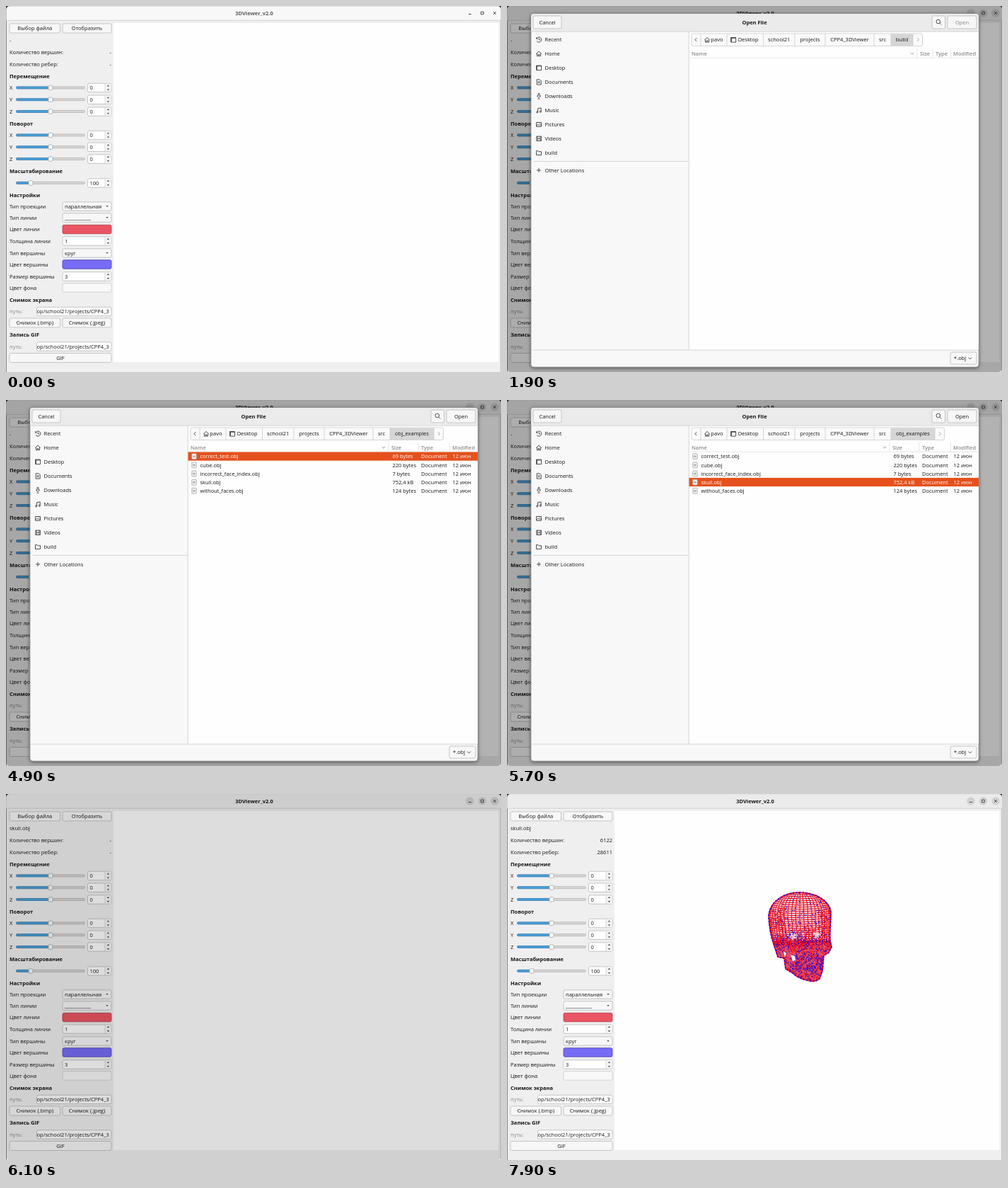
These frames come from a looping animation (700x517 px, 8000 ms). An HTML page:

```html
<!DOCTYPE html>
<html lang="ru">
<head>
<meta charset="utf-8">
<title>3DViewer_v2.0</title>
<style>
html, body { margin: 0; width: 100%; height: 100%; overflow: hidden; background: #2a2a2a; }
svg { display: block; }
#stage { width: 100vw; height: 100vh; }
text { font: 500 7.5px "Open Sans", "Noto Sans", sans-serif; fill: #161616; white-space: pre; }
.b { font-weight: 700; }
.dim { fill: #858585; }
.head { font-weight: 600; fill: #8c8c8c; }
.white { fill: #fff; }
.icon { fill: none; stroke: #3d3d3d; stroke-width: .9; }
#dialog { filter: drop-shadow(0 1px 2.5px rgba(0, 0, 0, .55)); }
</style>
</head>
<body>
<svg id="stage" viewBox="0 0 700 517">
  <defs><clipPath id="skullClip"><path id="skullShape"/></clipPath></defs>
  <g id="main"></g>
  <rect id="shade" width="700" height="517" rx="5"/>
  <g id="dialog"></g>
</svg>
<script>
const LOOP = 8000, TICK = 100;
const PANEL = '#efefef', LINE = '#cccccc', EDGE = '#b9b9b9', BUTTON = '#f7f7f7', PAPER = '#fefefe';
const $ = id => document.getElementById(id);

const text = (x, y, s, cls = '', anchor = 'start') =>
  `<text x="${x}" y="${y + 2.7}" class="${cls}" text-anchor="${anchor}">${s}</text>`;
const rect = (x, y, w, h, fill, stroke = 'none', r = 0) =>
  `<rect x="${x}" y="${y}" width="${w}" height="${h}" fill="${fill}" stroke="${stroke}" stroke-width=".8" rx="${r}"/>`;
const path = (d, attrs = 'class="icon"') => `<path d="${d}" ${attrs}/>`;
const button = (x, y, w, label, h = 13, cls = '') =>
  rect(x, y - h / 2, w, h, BUTTON, EDGE, 2) + text(x + w / 2, y, label, cls, 'middle');

// Main window
const SMALL = 'fill="#4a4a4a"';
const up = (x, y) => path(`M${x - 1.7} ${y + 1}h3.4l-1.7 -2z`, SMALL);
const down = (x, y) => path(`M${x - 1.7} ${y - 1}h3.4l-1.7 2z`, SMALL);

function spin(x, y, value) {
  return rect(x, y - 6.2, 149 - x, 12.4, PAPER, EDGE, 2) + rect(140, y - 5.8, 8.6, 11.6, '#f3f3f3') +
    path(`M140 ${y - 6}v12`, `stroke="${LINE}" stroke-width=".7"`) +
    up(144.5, y - 3) + down(144.5, y + 3) + text(x + 3, y, value);
}
function slider(y, pos, value, axis = '') {
  return text(5, y, axis) + rect(14.5, y - 1.6, 97, 3, '#d6d6d6', '#b4b4b4', 1.4) +
    rect(14.5, y - 1.6, pos - 14.5, 3, '#4a9fd8', '#3a83b6', 1.4) +
    rect(pos - 3, y - 3.2, 6, 6.4, '#fafafa', '#a5a5a5', 1.5) + spin(115.5, y, value);
}
const combo = (y, value) =>
  rect(80, y - 6.2, 69, 12.4, BUTTON, EDGE, 2) + text(83, y, value) + down(143, y);
const swatch = (y, fill, edge) => rect(80, y - 6.2, 69, 12.4, fill, edge, 2);
const pathField = y => text(5, y, 'путь:', 'dim') + rect(43.5, y - 6.2, 105.5, 12.4, PAPER, EDGE, 2) +
  `<svg x="43.5" y="${y - 6}" width="105" height="12">${text(0, 6, 'op/school21/projects/CPP4_3')}</svg>`;

function mainWindow() {
  const sections = [[99, 'Перемещение'], [166, 'Поворот'], [233, 'Масштабирование'],
    [267, 'Настройки'], [415, 'Снимок экрана'], [464, 'Запись GIF']];
  const labels = [[65, 'Количество вершин:'], [82, 'Количество ребер:'], [283, 'Тип проекции'],
    [299, 'Тип линии'], [315.5, 'Цвет линии'], [332, 'Толщина линии'], [349, 'Тип вершины'],
    [365, 'Цвет вершины'], [382, 'Размер вершины'], [398, 'Цвет фона']];
  const circles = [656, 673.5, 691].map(x => `<circle cx="${x}" cy="10" r="5.8" fill="#d2d2d2"/>`).join('');
  const bar = fill => path('M.5 20V5Q.5 .4 5 .4H695Q699.6 .4 699.6 5V20z', `fill="${fill}"`);
  return rect(.5, 0, 699.5, 530, PANEL, '#8a8a8a', 5) + bar('#f8f8f8') +
    `<g id="focused">${bar('#ebebeb') + circles}</g>` +
    path('M0 20.3H700', `stroke="${LINE}" stroke-width=".8"`) +
    rect(152, 24, 544.5, 479, PAPER) +
    path('M654 11.5h4M671.7 8.2h3.6v3.6h-3.6zM689.2 8.2l3.6 3.6M692.8 8.2l-3.6 3.6') +
    `<g id="title">${text(351, 10, '3DViewer_v2.0', 'b', 'middle')}</g>` +
    button(5, 31.5, 71.5, 'Выбор файла') + button(80, 31.5, 69, 'Отобразить') +
    '<g id="info"></g>' +
    sections.map(([y, s]) => text(5, y, s, 'b')).join('') +
    labels.map(([y, s]) => text(5, y, s)).join('') +
    [115.5, 182.5].map(y => [...'XYZ'].map((a, i) => slider(y + i * 16.8, 63, '0', a)).join('')).join('') +
    slider(250, 35, '100') +
    combo(283, 'параллельная') + combo(299, '___________') + swatch(315.5, '#ea5563', '#b03c48') +
    spin(80, 332, '1') + combo(349, 'круг') + swatch(365, '#776cf6', '#4a40b4') +
    spin(80, 382, '3') + swatch(398, '#f8f8f8', LINE) +
    pathField(431.5) + button(5, 447.5, 71.5, 'Снимок (.bmp)') + button(80, 447.5, 69, 'Снимок (.jpeg)') +
    pathField(481) + button(5, 497, 144, 'GIF') +
    `<g id="skull">${skull()}</g>`;
}

// Wireframe head
function skull() {
  const shape = 'M370 172C372 150 394 139 413 139C436 139 455 150 458 166C458 180 456 194 457 208L459 216' +
    'L455 224L448 228L446 250L442 261Q436 266 428 264Q412 261 404 253L394 247L392 232L383 230L377 212Q371 194 370 172Z';
  $('skullShape').setAttribute('d', shape);
  let seed = 11;
  const rnd = () => (seed = seed * 16807 % 2147483647) / 2147483647;
  const stroke = (c, w) => `fill="none" stroke="${c}" stroke-width="${w}"`;
  const scatter = (n, x, y, w, h, mark) => Array.from({ length: n }, () =>
    `M${(x + w * rnd()).toFixed(1)} ${(y + h * rnd()).toFixed(1)}${mark()}`).join('');
  const scribble = (n, x, y, w, h, len) => scatter(n, x, y, w, h, () =>
    `l${(len * (rnd() - .5)).toFixed(1)} ${(len * (rnd() - .5)).toFixed(1)}`);
  const dots = (n, x, y, w, h) => scatter(n, x, y, w, h, () => 'h1.3');

  let grid = '';
  for (let i = -12; i <= 12; i++) {
    const s = Math.sin(i * Math.PI / 24);
    grid += `M${415 + 10 * s} 138C${414 + 40 * s} 143 ${414 + 46 * s} 162 ${414 + 44 * s} 176L${417 + 41 * s} 214`;
  }
  for (let y = 140; y < 214; y += 3) grid += `M368 ${y - 2}Q414 ${y + 6} 460 ${y - 2}`;

  const RED = '#e2041c', BLUE = '#2408e0';
  return `<g clip-path="url(#skullClip)">` +
    rect(365, 135, 100, 75, '#fbdcdc') + rect(365, 207, 100, 60, '#e84a5c') +
    path(grid, stroke(RED, 1)) +
    path(scribble(190, 371, 160, 22, 55, 6) + scribble(130, 443, 160, 15, 50, 6) +
      scribble(90, 385, 186, 66, 22, 6), stroke(RED, .9)) +
    path('M398 199q7 -6 13 0q-2 6 -8 6zM432 198q6 -6 11 0q-2 6 -7 6z', 'fill="#fdeeee" opacity=".7"') +
    path(scribble(260, 378, 205, 80, 20, 7) + scribble(100, 412, 190, 24, 26, 6) +
      scribble(260, 392, 228, 56, 36, 7), stroke(RED, 1)) +
    path(scribble(150, 404, 226, 44, 22, 6) + scribble(90, 380, 204, 76, 20, 5) +
      scribble(40, 396, 246, 48, 17, 5), stroke(BLUE, 1)) +
    path(dots(210, 370, 139, 90, 70) + dots(130, 376, 194, 80, 34) + dots(90, 393, 228, 54, 36), stroke(BLUE, 1.3)) +
    path('M401 227l6 2l1 6l-4 1zM391 222l4 3l-2 6z', `fill="${PAPER}"`) + '</g>' +
    path(shape, stroke(RED, 1.5)) + path(shape, stroke(BLUE, 1.8) + ' stroke-dasharray="1.8 2.8"');
}

// File dialog
const ICONS = {
  Recent: 'M1 2.5A3.6 3.6 0 1 1 1 6M.6 .8v2.2h2.2M4.3 2.2v2.3h1.8',
  Home: 'M.3 4.2L4 .8l3.7 3.4M1.5 3.8v3.7h1.8v-2.3h1.4v2.3h1.8v-3.7',
  Desktop: 'M.6 .8h7v6.6h-7zM.6 1.6h7M1.4 1v6',
  Documents: 'M1.2 .5h4l2 2v5.3h-6zM2.6 3.5h3M2.6 5.2h3',
  Downloads: 'M3 .4h2v3.4h1.6L4 6.4L1.4 3.8h1.6zM2.4 7.8h3.2',
  Music: 'M2.6 6.6V1.4l4.6 -.8v5.2M.9 6.6a.9 .9 0 1 0 1.7 0a.9 .9 0 1 0 -1.7 0M5.5 5.9a.9 .9 0 1 0 1.7 0a.9 .9 0 1 0 -1.7 0',
  Pictures: 'M.5 1.2h7v5.8h-7zM1 6l2 -2.2l1.6 1.6l1 -1l1.7 1.6M5 2.8h1',
  Videos: 'M.8 .8h6.6v6.4h-6.6zM2.2 .8v6.4M6 .8v6.4M2.2 4h3.8',
  build: 'M.5 1.3h2.6l.8 1.1h3.6v4.8h-7z',
  'Other Locations': 'M1 4h6M4 1v6'
};
const icon = (name, x, y) => `<g transform="translate(${x - 4} ${y - 4})">${path(ICONS[name])}</g>`;
const rule = d => path(d, `stroke="${LINE}" stroke-width=".8"`);

function dialogFrame() {
  const places = Object.keys(ICONS).map((name, i) => {
    const y = i < 9 ? 47.3 + i * 20 : 232;
    return icon(name, 45, y) + text(53.5, y, name);
  }).join('');
  return rect(34, 11, 633, 499, '#f8f8f8', '#a0a0a0', 4) +
    path('M34 36V15Q34 11 38 11H663Q667 11 667 15V36z', 'fill="#ebebeb"') +
    rect(257, 36, 410, 450, PAPER) +
    rule('M34 36.2H667M257.2 36V486M34 486H667M38 219.5H257') +
    button(37, 23, 40, 'Cancel', 18) + text(350, 23, 'Open File', 'b', 'middle') +
    button(601, 23, 18.5, '', 18) + path('M607 22a2.8 2.8 0 1 0 5.6 0a2.8 2.8 0 1 0 -5.6 0M612 24.2l2.3 2.3') +
    places + button(627, 497.5, 37, '', 17) + text(632, 497.5, '*.obj') +
    path('M652.5 496.5l2.3 2.3l2.3 -2.3') + '<g id="browser"></g>';
}

const folder = (name, modified) => [name, '', '', modified];
const doc = (name, size) => [name, size, 'Document', '12 июн'];
const VIEWS = [
  { current: 6, last: 'build', end: 574, pitch: 12.4, sizeX: 584, typeX: 606, rows: [] },
  { current: 5, last: 'build', end: 574, pitch: 12.4, sizeX: 584, typeX: 606, rows: [
    folder('build', '19:24'), folder('controller', '19:14'), folder('lib', '12 июн'), folder('model', '19:14'),
    folder('obj_examples', '12 июн'), folder('static', '19:14'), folder('tests', 'Пн'), folder('view', '19:24')] },
  { current: 6, last: 'obj_examples', end: 605, pitch: 12.15, sizeX: 545, typeX: 587, rows: [
    doc('correct_test.obj', '69 bytes'), doc('cube.obj', '220 bytes'), doc('incorrect_face_index.obj', '7 bytes'),
    doc('skull.obj', '752,4 kB'), doc('without_faces.obj', '124 bytes')] }
];

function browser(view, selected) {
  const { current, last, end, pitch, sizeX, typeX, rows } = view;
  const edges = [274, 311, 362.5, 407, 450, 519, 543, end];
  const names = ['pavo', 'Desktop', 'school21', 'projects', 'CPP4_3DViewer', 'src', last];
  let out = button(623, 23, 41, 'Open', 18, rows.length ? '' : 'dim') +
    rect(261, 39, end + 13.5 - 261, 17.5, '#fafafa', LINE, 2.5) +
    rect(edges[current], 39.3, edges[current + 1] - edges[current], 17, '#d6d6d6') +
    rule(edges.map(x => `M${x} 39v17.5`).join('')) +
    path('M268.3 45.2l-2.4 2.5l2.4 2.5') + path(`M${end + 6} 45.2l2.4 2.5l-2.4 2.5`, 'class="icon" opacity=".5"') +
    icon('Home', 283, 47.7) + icon('Desktop', 320, 47.7);
  names.forEach((name, i) => {
    const shift = i < 2 ? 4.4 : 0;
    out += text((edges[i] + edges[i + 1]) / 2 + shift, 47.7, name, '', 'middle');
  });
  out += text(261, 67, 'Name', 'head') + text(sizeX, 67, 'Size', 'head') + text(typeX, 67, 'Type', 'head') +
    text(631, 67, 'Modified', 'head') + path(`M${sizeX - 13.3} 66l2.2 2.2l2.2 -2.2`, 'class="icon" opacity=".6"') +
    path(`M258 73.3H667M${sizeX - 4} 60v13M${typeX - 4} 60v13M627.5 60v13`, 'stroke="#dedede" stroke-width=".7"');
  rows.forEach(([name, size, type, modified], i) => {
    const y = 79.7 + i * pitch, cls = i === selected ? 'white' : '';
    if (cls) out += rect(257.5, y - 6.2, 409.5, pitch, '#e5511d');
    out += size
      ? rect(262.8, y - 3.9, 6.4, 7.8, '#f5f5f5', '#a3a3a3', .8) + rect(264.3, y - 1.3, 3.3, 2.8, '#b3b3b3')
      : path(`M262 ${y - 3.4}h3l1 1h4v5.8h-8z`, 'fill="#666062"') + rect(262, y - 1.6, 8, 1.1, '#b0603c');
    out += text(274.5, y, name, cls) + text(sizeX + 1.5, y, size, cls) +
      text(typeX, y, type, cls) + text(631.5, y, modified, cls);
  });
  return out;
}

// Timeline: [start ms, value]; each value holds until the next entry
const TRACKS = {
  focus: [[0, 0], [600, .4], [700, .75], [800, 1]],
  shade: [[0, 0], [1400, .06], [1500, .13], [1600, .19], [1700, .24], [1800, .28], [1900, .3],
    [6000, .22], [6100, .13], [6200, .05], [6300, 0]],
  open: [[0, 0], [1400, .6], [1500, 1], [6000, .108], [6100, 0]],
  view: [[0, 0], [3100, 1], [4500, 2]],
  selected: [[0, -1], [3100, 0], [4300, 4], [4500, 0], [5500, 3]],
  file: [[0, '-'], [6000, 'skull.obj']],
  shown: [[0, false], [7200, true]]
};
const at = (track, t) => track.reduce((value, [start, next]) => t >= start ? next : value, track[0][1]);

$('main').innerHTML = mainWindow();
$('dialog').innerHTML = dialogFrame();
let previous = '';

function render(time) {
  const t = Math.floor(time % LOOP / TICK) * TICK;
  const s = {};
  for (const key in TRACKS) s[key] = at(TRACKS[key], t);
  const state = JSON.stringify(s);
  if (state === previous) return;
  previous = state;
  $('focused').setAttribute('opacity', s.focus);
  $('title').setAttribute('opacity', .7 + .3 * s.focus);
  $('shade').setAttribute('opacity', s.shade);
  $('dialog').setAttribute('visibility', s.open ? 'visible' : 'hidden');
  $('dialog').setAttribute('transform', `translate(0 261) scale(1 ${s.open || 1}) translate(0 -261)`);
  $('browser').innerHTML = browser(VIEWS[s.view], s.selected);
  $('info').innerHTML = text(5, 48, s.file) +
    text(149, 65, s.shown ? '6122' : '-', '', 'end') + text(149, 82, s.shown ? '28611' : '-', '', 'end');
  $('skull').setAttribute('visibility', s.shown ? 'visible' : 'hidden');
}

const begin = performance.now();
function frame() {
  render(performance.now() - begin);
  requestAnimationFrame(frame);
}
frame();
</script>
</body>
</html>
```
